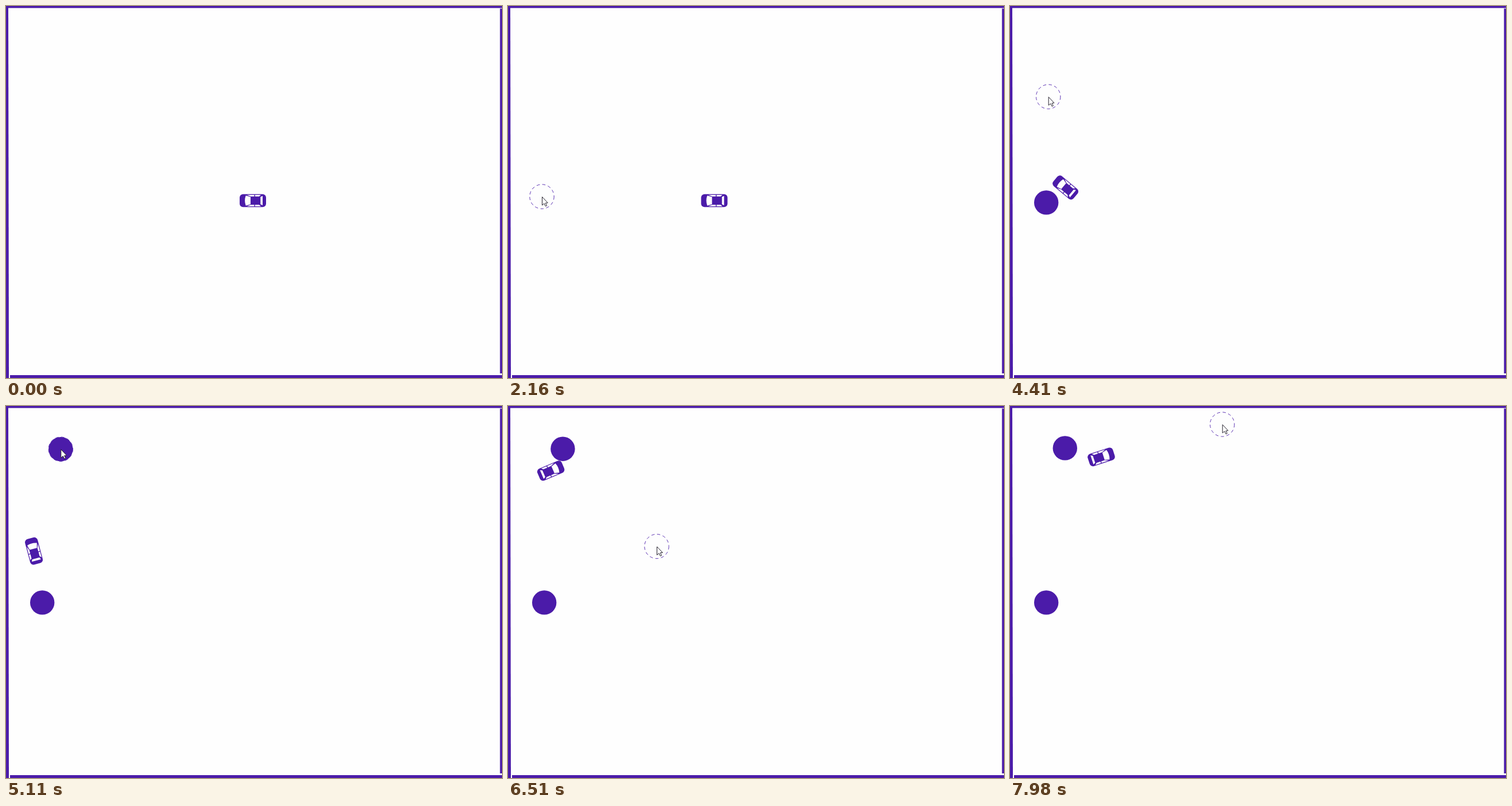
These frames come from a looping animation (864x648 px, 8 s). An HTML page with a canvas:

```html
<!DOCTYPE html>
<html lang="en">
<head>
<meta charset="utf-8">
<title>Car and obstacles</title>
<style>
  html, body { margin: 0; width: 100%; height: 100%; overflow: hidden; background: #fefefe; }
  canvas { display: block; }
</style>
</head>
<body>
<canvas id="stage" width="864" height="648"></canvas>
<script>
const ctx = document.getElementById('stage').getContext('2d');
const LOOP = 8000;
const INK = '#4b1ba9';
const PAPER = '#fefefe';
const RADIUS = 21.2;
const CRUISE = 0.118; // px per ms

// The car steers through these poses; between them its heading sets the curve.
const pose = (t, x, y, heading, speed = CRUISE) => ({ t, x, y, heading, speed });
const drive = [
  pose(1330, 430, 339, 180, 0),
  pose(2160, 359.5, 339, 180),
  pose(3600, 189, 339, 180),
  pose(4410, 96.7, 316.3, 220),
  pose(5810, 46.3, 177, 290),
  pose(6510, 74.6, 112.7, 337, 0.02),
  pose(7060, 82, 109.7, 338, 0.03),
  pose(7980, 159, 88.7, 342)
];

// The pointer glides to each stop and rests there.
const glide = (from, to, x, y) => ({ from, to, x, y });
const entry = { x: 40, y: 0 };
const glides = [
  glide(1400, 2160, 59, 332),
  glide(2160, 2300, 63.2, 342.4),
  glide(2640, 2960, 70.5, 450),
  glide(2960, 3300, 132.5, 480),
  glide(3850, 4410, 66.7, 158),
  glide(4640, 4900, 95.3, 75.2),
  glide(5300, 5740, 259, 244.5),
  glide(6650, 7400, 381, 38),
  glide(7750, 7980, 369.7, 32)
];

const clamp = u => Math.min(1, Math.max(0, u));
const mix = (a, b, u) => a + (b - a) * u;
const smooth = u => u * u * (3 - 2 * u);
const radians = deg => deg * Math.PI / 180;

function hermite(a, b, va, vb, u) {
  return mix(a, b, smooth(u)) + va * u * (1 - u) ** 2 - vb * u * u * (1 - u);
}

function carAt(t) {
  const next = drive.findIndex(p => p.t > t);
  if (next === 0) return drive[0];
  if (next < 0) return drive[drive.length - 1];
  const a = drive[next - 1], b = drive[next];
  const span = b.t - a.t, u = (t - a.t) / span;
  const along = (p, fn) => p.speed * span * fn(radians(p.heading));
  return {
    x: hermite(a.x, b.x, along(a, Math.cos), along(b, Math.cos), u),
    y: hermite(a.y, b.y, along(a, Math.sin), along(b, Math.sin), u),
    heading: mix(a.heading, b.heading, u)
  };
}

function pointerAt(t) {
  return glides.reduce((p, g) => {
    const u = smooth(clamp((t - g.from) / (g.to - g.from)));
    return { x: mix(p.x, g.x, u), y: mix(p.y, g.y, u) };
  }, entry);
}

function polygon(...points) {
  ctx.beginPath();
  points.forEach(([x, y]) => ctx.lineTo(x, y));
  ctx.closePath();
  ctx.fill();
}

function circle(x, y) {
  ctx.beginPath();
  ctx.arc(x, y, RADIUS, 0, Math.PI * 2);
}

function drawBorder() {
  ctx.fillStyle = INK;
  ctx.fillRect(0, 0, 864, 3.5);
  polygon([0, 0], [4, 0], [5, 648], [0, 648]);
  ctx.fillRect(860.5, 4.5, 3.5, 635.5);
  ctx.fillRect(7, 643, 857, 5);
}

function drawBall(x, y) {
  ctx.fillStyle = INK;
  circle(x, y);
  ctx.fill();
}

function drawCar({ x, y, heading }) {
  ctx.save();
  ctx.translate(x, y);
  ctx.rotate(radians(heading));
  ctx.fillStyle = INK;
  ctx.beginPath();
  ctx.roundRect(-23, -11.3, 46, 22.6, 6);
  ctx.fill();

  // Windscreen, rear window, then both pairs of side windows
  ctx.fillStyle = PAPER;
  ctx.beginPath();
  ctx.moveTo(12.3, -8.7);
  ctx.quadraticCurveTo(15.5, 0, 12.3, 8.7);
  ctx.lineTo(4, 6.5);
  ctx.lineTo(4, -6.5);
  ctx.fill();
  polygon([-13.3, -6.5], [-17, -8.3], [-17, 8.3], [-13.3, 6.5]);
  for (const s of [-1, 1]) {
    polygon([10.5, 10.1 * s], [-2.5, 10.1 * s], [-2.5, 7.3 * s], [3.5, 7.3 * s]);
    polygon([-3.9, 10.1 * s], [-14, 10.1 * s], [-11, 7.3 * s], [-3.9, 7.3 * s]);
  }
  ctx.restore();
}

function drawPointer({ x, y }) {
  ctx.save();
  ctx.translate(x, y);
  ctx.strokeStyle = '#5a30b2';
  ctx.setLineDash([5.5, 4.5]);
  circle(0, 0);
  ctx.stroke();

  ctx.setLineDash([]);
  ctx.strokeStyle = '#24202c';
  ctx.fillStyle = '#fff';
  polygon([0.5, 0.5], [0.5, 15], [4, 12], [6.4, 16.8], [8.6, 15.8], [6.3, 11.2], [10.3, 10.9]);
  ctx.stroke();
  ctx.restore();
}

function draw(t) {
  ctx.fillStyle = PAPER;
  ctx.fillRect(0, 0, 864, 648);
  if (t >= 2480) drawBall(63.2, 342.4);
  if (t >= 5060) {
    const push = smooth(clamp((t - 6200) / 900));
    drawBall(95.3 + 0.5 * push, 75.2 - 1.8 * push);
  }
  drawCar(carAt(t));
  if (t >= glides[0].from) drawPointer(pointerAt(t));
  drawBorder();
}

const start = performance.now();
function tick() {
  draw((performance.now() - start) % LOOP);
  requestAnimationFrame(tick);
}
tick();
</script>
</body>
</html>
```
